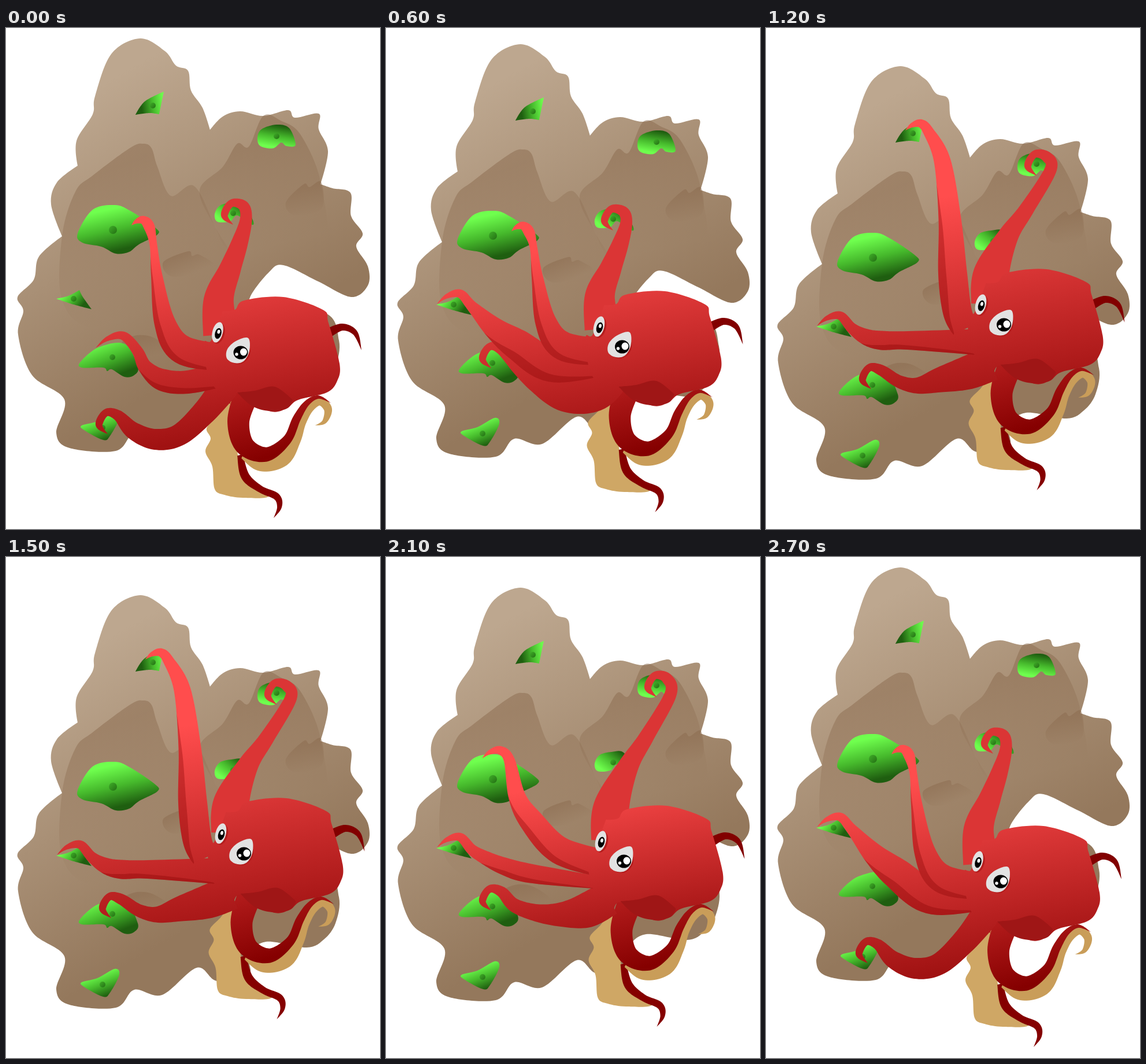
Recreate the animation shown at these times as an HTML page with a canvas. Size 647x866 px, loop 3000 ms.

```html
<!DOCTYPE html>
<html>
<head>
<meta charset="utf-8">
<title>Climbing octopus</title>
<style>
html, body { margin: 0; width: 100%; height: 100%; overflow: hidden; background: #fff; }
canvas { display: block; }
</style>
</head>
<body>
<canvas id="stage" width="647" height="866"></canvas>
<script>
const ctx = document.getElementById('stage').getContext('2d');

// Closed smooth curve through "x,y" points; "!" marks a sharp corner.
function blob(text, fill) {
  const pts = text.split(' ').map(p => [...p.split(',').map(parseFloat), p.endsWith('!')]);
  const n = pts.length, at = i => pts[(i + n) % n];
  const slope = (i, k) => at(i)[2] ? 0 : (at(i + 1)[k] - at(i - 1)[k]) / 6;
  ctx.beginPath();
  ctx.moveTo(pts[0][0], pts[0][1]);
  for (let i = 0; i < n; i++) {
    const [ax, ay] = at(i), [bx, by] = at(i + 1);
    ctx.bezierCurveTo(ax + slope(i, 0), ay + slope(i, 1),
      bx - slope(i + 1, 0), by - slope(i + 1, 1), bx, by);
  }
  ctx.fillStyle = fill;
  ctx.fill();
}

// Tapered limb along a spine of [x, y, width]; inner(t) sets its second edge.
function limb(spine, fill, inner = () => -.5) {
  const n = spine.length - 1, steps = n * 12;
  const at = i => spine[Math.max(0, Math.min(n, i))];
  const sample = t => {
    const i = Math.min(n - 1, Math.floor(t * n)), u = t * n - i;
    return [0, 1, 2].map(k => {
      const [a, b, c, d] = [-1, 0, 1, 2].map(j => at(i + j)[k]);
      return b + u / 2 * (c - a + u * (2 * a - 5 * b + 4 * c - d + u * (3 * (b - c) + d - a)));
    });
  };
  const near = [], far = [];
  for (let s = 0; s <= steps; s++) {
    const t = s / steps, [x, y, w] = sample(t);
    const [x0, y0] = sample(Math.max(0, t - .004)), [x1, y1] = sample(Math.min(1, t + .004));
    const scale = Math.max(0, w) / Math.hypot(x1 - x0, y1 - y0);
    const nx = (y0 - y1) * scale, ny = (x1 - x0) * scale, k = inner(t);
    near.push([x + nx / 2, y + ny / 2]);
    far.unshift([x + nx * k, y + ny * k]);
  }
  ctx.beginPath();
  [...near, ...far].forEach(p => ctx.lineTo(...p));
  ctx.fillStyle = fill;
  ctx.fill();
}

function fade(x0, y0, x1, y1, ...colors) {
  const g = ctx.createLinearGradient(x0, y0, x1, y1);
  colors.forEach((c, i) => g.addColorStop(i / (colors.length - 1), c));
  return g;
}
function oval(x, y, rx, ry, turn, fill) {
  ctx.beginPath();
  ctx.ellipse(x, y, rx, ry, turn, 0, 7);
  ctx.fillStyle = fill;
  ctx.fill();
}

const ROCK = '232,18 275,40 294,65 315,74 320,108 340,138 353,176! 375,153 405,144 445,152 488,142 500,155 541,148 ' +
  '541,175 557,213 544,270! 565,277 596,285 597,325 617,355 606,378 626,412 626,445 597,465 540,438 480,410 455,422 ' +
  '422,466 430,490 550,492 576,540 570,585 550,613 520,627 450,617 420,640 420,675 365,685 330,662 270,709 222,700 ' +
  '190,731 110,726 87,700 101,642 45,600 21,530 30,489 20,465 48,435 57,395 97,360! 78,305 88,267 124,238! 122,195 ' +
  '150,149 154,118 182,45';

// outline, then the line along which it fades out
const CRAGS = [
  ['238,200 215,207 150,255 120,283 97,360 97,470 150,520 280,520 400,440 360,340 325,273 285,290 262,240 252,208', 190, 240, 270, 480],
  ['445,152 420,205 400,200 375,240 335,280 360,340 400,390 545,390 545,270 510,185 475,160', 440, 200, 480, 370],
  ['272,405 315,386 322,394 335,392 360,414 290,430', 300, 392, 315, 428],
  ['484,302 515,270 525,275 545,266 546,312 500,324', 510, 275, 520, 325],
  ['200,548 222,532 255,535 285,560 240,572', 235, 535, 245, 570]
];

// outline, bolt, bolt radius, direction from light to dark, half length of the fade
const HOLDS = [
  ['273,110! 265,149! 248,147 224,150! 240,127', 254, 134, 5, Math.PI * .95, 20],
  ['468,167 490,173 501,202 485,204 476,198 462,208 440,204 435,190 442,175', 468, 187, 5, -1.4, 19],
  ['390,302 411,303 427,332 425,340 400,324 388,334 366,335 361,322 370,307', 393, 320, 5, -.9, 22],
  ['188,306 215,316 258,345 262,357 230,374 213,387 190,390 165,378 132,371 124,355 150,314', 185, 349, 7, 1.35, 36],
  ['87,468! 108,463 127,453! 133,465 148,486! 117,478', 117, 468, 5, .7, 19],
  ['129,577 160,552 205,546 228,585 222,600 205,603 183,590 175,593 168,587 131,587', 184, 569, 5, 1.2, 32],
  ['131,687 158,680 188,664 196,674 180,705 168,712 135,695', 167, 691, 5, 1.2, 21]
];

const ROCK_Y = [0, 0, 10, 35, 48];
const RED_TOP = [385, 385, 385, 400, 300], RED_END = [715, 715, 715, 680, 665];
const body = pose => [Math.min(5.5, ROCK_Y[pose] / 4), -ROCK_Y[pose]];

// Two ways to hold on, as spines starting at the tip.
const curl = (x, y) => [[0, 20, 0], [-15, 4, 12], [-3, -17, 13], [18, -12, 19]]
  .map(p => [x + p[0], y + p[1], p[2]]);
const hook = (x, y, size) => [[0, 0, 0], [13, -10, 8], [30, -13, 15], [45, 3, 19]]
  .map(p => [x + p[0] * size, y + p[1] * size, p[2]]);

// Each arm, keyed by the first pose of its hold: grip on the rock, then the spine to the root.
const RIGHT_ARM = {
  0: [curl(393, 320), [415, 332, 21], [404, 372, 29], [387, 418, 38], [368, 470, 52], [372, 530, 62]],
  3: [curl(468, 187), [492, 238, 21], [450, 312, 26], [419, 362, 36], [390, 432, 62], [388, 490, 66]]
};
const TOP_ARM = {
  0: [hook(217, 341, .68), [255, 375, 13], [261, 430, 20], [275, 510, 37], [305, 556, 50], [375, 570, 46]],
  3: [hook(166, 313, 1.05), [227, 415, 30], [252, 457, 42], [300, 507, 48], [375, 530, 48]],
  4: [hook(241, 129, .9), [305, 230, 29], [318, 330, 39], [323, 425, 50], [331, 490, 50], [345, 520, 46]]
};
const MID_ARM = {
  0: [hook(155, 553, 1.6), [241, 586, 25], [270, 608, 38], [314, 612, 40], [375, 598, 44]],
  1: [hook(88, 467, 1.35), [187, 514, 38], [227, 548, 54], [285, 588, 58], [370, 590, 44]],
  3: [hook(88, 467, 1.35), [172, 520, 24], [203, 534, 30], [250, 547, 33], [370, 563, 22]],
  4: [hook(88, 467, 1.35), [173, 534, 28], [200, 540, 33], [245, 540, 32], [375, 543, 46]]
};
const LOW_ARM = {
  0: [curl(176, 682), [220, 696, 30], [258, 711, 36], [300, 703, 38], [345, 662, 43], [380, 618, 50]],
  2: [curl(182, 558), [232, 588, 28], [262, 607, 46], [310, 632, 62], [360, 630, 66], [395, 600, 60]],
  3: [curl(182, 556), [222, 602, 24], [260, 615, 30], [302, 618, 42], [346, 611, 60], [385, 590, 60]],
  4: [curl(182, 556), [230, 611, 22], [262, 618, 28], [302, 608, 44], [348, 596, 58], [390, 580, 60]]
};

// The grip stays with the rock while the root follows the body.
function arm(set, pose, fill, shaded) {
  const key = Math.max(...Object.keys(set).filter(k => k <= pose));
  const [grip, ...rest] = set[key], [bx, by] = body(pose), [kx, ky] = body(key);
  const lift = ROCK_Y[pose] - ROCK_Y[key];
  const spine = grip.map(([x, y, w]) => [x, y + ROCK_Y[pose], w]);
  rest.forEach(([x, y, w], i) => {
    const s = (i + 1) / rest.length;
    spine.push([x + (bx - kx) * s, y + lift + (by - ky - lift) * s, w]);
  });
  limb(spine, fill);
  if (shaded) limb(spine, 'rgba(130,0,0,.33)', t => .5 - .28 * Math.sin(Math.PI * Math.max(0, (t - .55) / .45)));
}

function drawRock() {
  blob(ROCK, fade(230, 60, 483, 500, '#bda78f', '#94785c'));
  CRAGS.forEach(([path, ...line]) => blob(path, fade(...line, 'rgba(138,106,78,.5)', 'rgba(138,106,78,0)')));
  HOLDS.forEach(([path, x, y, r, turn, half]) => {
    const dx = Math.cos(turn) * half, dy = Math.sin(turn) * half;
    blob(path, fade(x - dx, y - dy, x + dx, y + dy, '#6fff4e', '#46b92c', '#1f5e10'));
    oval(x, y, r, r, 0, fade(x - r, y - r, x + r, y + r, '#3fae28', '#246f14'));
  });
}

function drawLegs() {
  limb([[558, 527, 16], [582, 517, 12], [604, 527, 9], [615, 557, 0]], '#820000');
  blob('390,645 365,672 347,692 354,710 345,732 357,758 361,797 378,807 410,812 455,808 410,770 395,690', '#cfa765');
  limb([[405, 738, 10], [414, 775, 15], [440, 797, 12], [468, 810, 12], [473, 828, 8], [463, 847, 0]], '#850000');
  limb([[408, 742, 4], [440, 754, 24], [478, 744, 28], [500, 712, 20], [511, 682, 16], [524, 656, 18],
    [543, 645, 15], [557, 659, 14], [551, 680, 8], [535, 687, 0]], '#c99d59');
  limb([[415, 635, 42], [402, 680, 38], [413, 722, 34], [450, 737, 25], [486, 712, 16], [503, 675, 14],
    [520, 649, 10], [540, 638, 6], [562, 648, 0]], fade(390, 640, 420, 750, '#b01a1a', '#850000'));
}

function drawHead(red) {
  blob('412,471 480,465 548,487 558,510 577,580 573,610 555,630 505,643 485,658 455,662 400,632 388,650! ' +
    '352,607 343,545 355,540 375,489! 396,487', red);
  blob('400,630! 430,627 465,620 496,643! 485,658 455,662 425,653', '#9f1616');
  oval(368, 528, 10, 18, .25, '#b51d1d');
  oval(366, 526, 9, 18, .25, '#e2e2e2');
  oval(367, 528, 5.5, 9.5, .25, '#000');
  oval(368, 525, 2.5, 3.5, .2, '#fff');
  oval(404, 561, 18, 21, .5, '#b51d1d');
  blob('419,536 421,558 411,576 395,579 382,571 383,555 398,541', '#e2e2e2');
  oval(406, 561, 12.5, 11.5, 0, '#000');
  oval(411, 560, 6, 6.5, 0, '#fff');
  oval(399, 564, 2.7, 2.7, 0, '#fff');
}

function at(x, y, draw) {
  ctx.save();
  ctx.translate(x, y);
  draw();
  ctx.restore();
}

function drawScene(pose) {
  const [x, y] = body(pose), top = RED_TOP[pose], drop = RED_END[pose] - top;
  const red = (dx, dy) => fade(260 - dx, top - dy, 260 - dx + .18 * drop, top - dy + drop, '#ff4d4d', '#a01212');
  ctx.fillStyle = '#fff';
  ctx.fillRect(0, 0, 647, 866);
  at(0, ROCK_Y[pose], drawRock);
  at(x, y, drawLegs);
  arm(RIGHT_ARM, pose, '#db3535');
  arm(LOW_ARM, pose, red(0, 0));
  arm(MID_ARM, pose, red(0, 0), true);
  arm(TOP_ARM, pose, red(0, 0), true);
  at(x, y, () => drawHead(red(x, y)));
}

// Climb up through the poses, rest at the top, climb back down.
const start = performance.now();
function tick() {
  const step = Math.floor((performance.now() - start) % 3000 / 300);
  drawScene(Math.min(4, 5 - Math.abs(5 - step)));
  requestAnimationFrame(tick);
}
tick();
</script>
</body>
</html>
```
